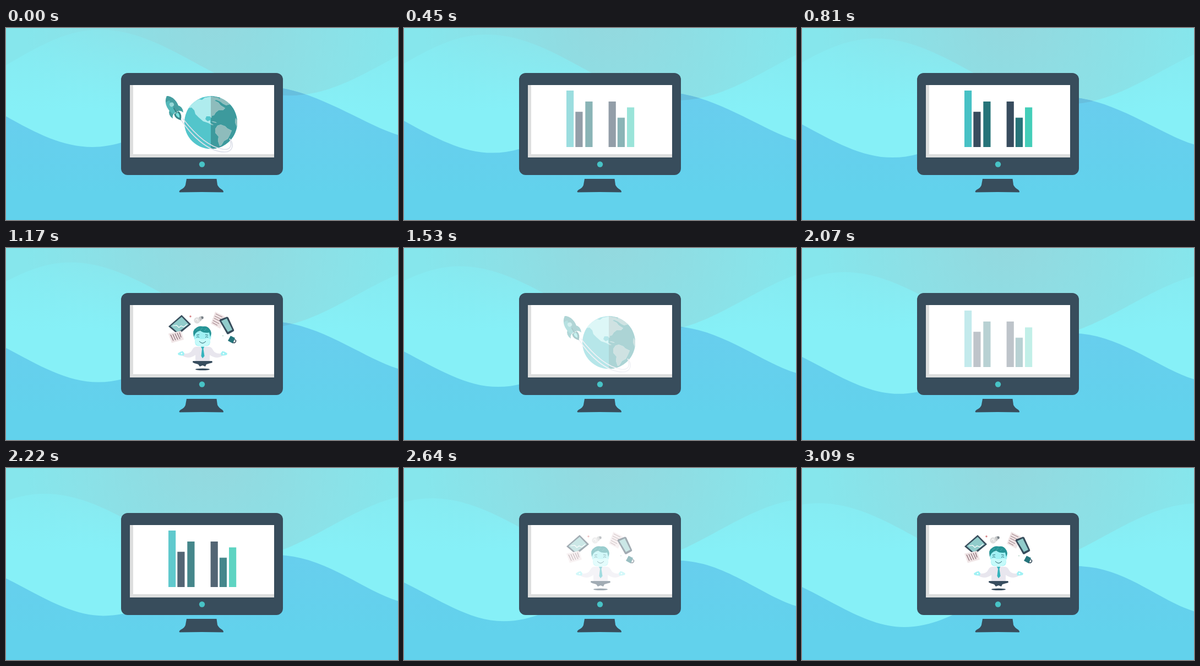
Recreate the animation shown at these times as an HTML page. Size 712x350 px, loop 3150 ms.

```html
<!DOCTYPE html>
<html lang="en">
<head>
<meta charset="utf-8">
<title>Monitor over waves</title>
<style>
  html, body { margin: 0; width: 100%; height: 100%; overflow: hidden; }
  svg { display: block; width: 100vw; height: 100vh; }
</style>
</head>
<body>
<svg viewBox="0 0 712 350" preserveAspectRatio="none">
  <defs>
    <radialGradient id="sky" gradientUnits="userSpaceOnUse" cx="375" cy="-20" r="340">
      <stop offset="0" stop-color="#94d8de"/>
      <stop offset="1" stop-color="#86e6ec"/>
    </radialGradient>
    <linearGradient id="mist" gradientUnits="userSpaceOnUse" x1="0" y1="0" x2="0" y2="150">
      <stop offset="0" stop-color="#86f1f8" stop-opacity=".25"/>
      <stop offset="1" stop-color="#86f0f7"/>
    </linearGradient>
    <linearGradient id="sea" gradientUnits="userSpaceOnUse" x1="0" y1="120" x2="0" y2="300">
      <stop offset="0" stop-color="#69cdee"/>
      <stop offset="1" stop-color="#62d2ec"/>
    </linearGradient>
    <clipPath id="seaClip"><path id="seaClipPath"/></clipPath>
    <clipPath id="globe"><circle cx="372" cy="172.3" r="48"/></clipPath>
    <clipPath id="east"><rect x="372" y="120" width="50" height="104"/></clipPath>
    <path id="land" d="M331 146L336 139L344 133L351 130L356 131L361 127L372 125L384 127L397 134L403 140L400 141L394 138L389 134L382 131L378 132L386 136L390 141L398 146L394 150L386 150L381 154L378 159L374 160L373 164L370 161L364 161L362 166L366 170L371 168L371 173L377 177L374 177L367 173L358 170L350 163L344 157L342 150L337 145Z
      M384 178L390 176L398 179L402 183L410 187L407 194L403 202L396 206L391 214L388 215L385 206L386 198L380 191L380 184Z
      M388 128L396 129L407 139L404 140L396 135Z M417 164L421 170L419 180L416 172Z M373 170L380 171L383 173L377 172Z"/>
  </defs>

  <rect width="712" height="350" fill="url(#sky)"/>
  <path id="hump" fill="url(#mist)"/>
  <path id="water" fill="url(#sea)"/>
  <path id="overlap" fill="#67bfde" clip-path="url(#seaClip)"/>

  <g fill="#384d5c">
    <rect x="209" y="82" width="294" height="186" rx="12"/>
    <path d="M328 275H382.500L384 286Q386 291 393 295Q396 298 394.500 299.500Q356 298.500 315.500 299.500Q313 298 317 295Q325 291 326 286Z"/>
  </g>
  <rect x="225" y="104" width="262" height="132" fill="#dddede"/>
  <rect x="231" y="104" width="256" height="126" fill="#fff"/>
  <circle cx="356" cy="248.500" r="5.200" fill="#47c2c5"/>

  <g id="travel">
    <circle cx="372" cy="172.300" r="48" fill="#47c1c8"/>
    <path d="M372 124.300A48 48 0 0 1 372 220.300Z" fill="#2f9396"/>
    <g clip-path="url(#globe)">
      <use href="#land" fill="#a9ebed"/>
      <use href="#land" fill="#86b8b7" clip-path="url(#east)"/>
    </g>
    <g fill="none" stroke="#dcdfe9" stroke-width="1.700">
      <path d="M317 166C335 194 366 226 397 226C414 226 414 209 406 202"/>
      <path d="M321 165C342 192 368 217 394 221C407 223 411 215 407 205"/>
    </g>
    <g transform="translate(292 124) rotate(-30)">
      <path d="M-8 24Q-16 31 -11 41Q-9 35 -4 34ZM8 24Q16 31 11 41Q9 35 4 34Z" fill="#389b9d"/>
      <path d="M0 0C9 6 13 18 7 34H-7C-13 18 -9 6 0 0Z" fill="#46b3b4"/>
      <path d="M0 0C9 6 13 18 7 34H0Z" fill="#3a9799"/>
      <path d="M0 0Q5 4 7.500 9H-7.500Q-5 4 0 0Z" fill="#389799"/>
      <circle cy="18" r="4" fill="#8fd5d5"/>
      <path d="M0 25V35" stroke="#267174" stroke-width="1.500"/>
      <path d="M-5 35H5Q8 43 0 51Q-8 43 -5 35Z" fill="#267c7f"/>
      <path d="M-2 36H2Q4 41 0 46Q-4 41 -2 36Z" fill="#72e0dc"/>
    </g>
  </g>

  <g id="bars"></g>

  <g id="calm">
    <ellipse cx="357" cy="221.300" rx="13" ry="1.800" fill="#384d5e"/>
    <path d="M340 206H374Q377 209 371 210L364 212L362 216L357 214L352 216L349 212L342 210Q337 208 340 206Z" fill="#384d5e"/>
    <path d="M347 180Q341 179 338 186Q334 194 322 192L320 196Q332 204 344 195V206H370V195Q383 204 394 196L392 192Q380 194 376 186Q373 179 367 180Z" fill="#e8e6ee"/>
    <g fill="#a0f1f4">
      <path d="M324 192L321 188L317 189L312 192L313 195L318 196L323 196ZM390 192L393 188L397 189L402 192L401 195L396 196L391 196Z"/>
      <path d="M342 154Q340 162 343 168Q342 178 350 179H364Q372 178 371 168Q374 161 372 153L364 149Z"/>
    </g>
    <path d="M343 166Q348 163 354 166H361Q367 163 371 166Q372 179 357 180Q342 179 343 166Z" fill="#c5fafa"/>
    <path d="M341 162Q338 149 345 146Q350 141 358 143Q366 142 370 148Q375 154 371 162L369 154Q360 156 353 151Q347 152 344 156Z" fill="#269496"/>
    <path d="M346 150L350 146M353 150L357 145M360 151L364 147" stroke="#4db4b4" stroke-width=".8"/>
    <g fill="none" stroke="#2a6470" stroke-width="1">
      <path d="M346 163Q348.500 160 351 163M362 163Q364.500 160 367 163M351 170Q357 177 363 170M346 159L351 158M362 158L367 159"/>
    </g>
    <path d="M354 180H360L358.500 184L360.500 197L357 201L354.500 197L356 184Z" fill="#36b4bd"/>
    <circle cx="319" cy="192.500" r="1.300" fill="#fff"/>
    <circle cx="395" cy="192.500" r="1.300" fill="#fff"/>

    <path d="M319 122L336 139L313 158L295 143Z" fill="#384d5c"/>
    <path d="M319 125.500L332 139L312 154L299 142.500Z" fill="#91cccb"/>
    <path d="M303 142L310 141L314 145L318 142L323 144L329 139" fill="none" stroke="#fff" stroke-width="1.200"/>
    <path d="M295 156L318 151L323 167L301 173Z" fill="#f0e5e6"/>
    <path d="M299 158L304 169M303 157L308 168M307 156L312 167M311 155L316 166M315 154L318 163" stroke="#8c7078" stroke-width="1.300"/>
    <path d="M380 116L398 125L389 147L372 138Z" fill="#f0e5e6"/>
    <path d="M381 120L393 126M379 124L391 130M378 128L390 134M376 132L387 138M375 136L384 141" stroke="#a58a90" stroke-width="1.200"/>
    <path d="M389 130L401 125.500Q403 125 404 127L414 149Q415 151 413 152L404 157Q402 158 401 156L388 133Q387 131 389 130Z" fill="#384d5c"/>
    <path d="M391 133L401 128.500L411 149L403 153Z" fill="#91cccb"/>
    <circle cx="347" cy="132" r="5.700" fill="#dedede"/>
    <path d="M350 126L355 124L358 128L353 134Z" fill="#c4c6c7"/>
    <path d="M354 125L358 124.500L359 128L356 130Z" fill="#777f85"/>
    <path d="M344 132L347 129L349 134" fill="none" stroke="#fff" stroke-width="1"/>
    <circle cx="335" cy="124.700" r="1.700" fill="#d98588"/>
    <circle cx="394" cy="160" r="1.200" fill="#c5dfd4"/>
    <path d="M408 160L416 164L412 174L403 169Z" fill="#24747b"/>
    <path d="M415 167Q419 168 417 171Q415 174 412 172" fill="none" stroke="#384d5c" stroke-width="1.600"/>
  </g>
</svg>
<script>
const LOOP = 3150, STEP = 30, CYCLE = 1680, FADE = 280;
const $ = id => document.getElementById(id);
const slides = [
  { node: $('bars'), start: 300 },
  { node: $('calm'), start: 830 },
  { node: $('travel'), start: 1420 }
];

const barColors = ['#47c1c5', '#384c5e', '#277479', '#384c5e', '#277479', '#44ceb9'];
const barSpots = [[295, 114], [311.3, 152.7], [329.3, 134], [371.6, 134], [387.8, 163.5], [405, 144.7]];
$('bars').innerHTML = barSpots.map(([x, y], i) =>
  `<rect x="${x}" y="${y}" width="13.200" height="${217 - y}" fill="${barColors[i]}"/>`).join('');

// A cosine crest that drifts left while it sinks.
function humpLine(t) {
  const peak = 170 - 0.0453 * t, top = 3 + 0.0198 * t;
  const points = [];
  for (let x = 0; x <= 712; x += 4) {
    const phase = (x - peak) / 346 * Math.PI * (x < peak ? 1.07 : 1);
    points.push(`${x} ${(top + 60 * (1 - Math.cos(phase))).toFixed(2)}`);
  }
  return 'M' + points.join('L');
}

function waterPath(t) {
  const left = 161 + 0.0181 * t, right = 195 + 0.0214 * t;
  const tx = 157 + 0.0091 * t, ty = 217 + 0.0236 * t;
  const cx = 470 + 0.0097 * t, cy = 107 + 0.0233 * t;
  return `M0 ${left}C${tx * 0.35} ${left + 31} ${tx * 0.66} ${ty} ${tx} ${ty}` +
    `C${tx + 110} ${ty} ${cx - 125} ${cy} ${cx} ${cy}` +
    `C${cx + 85} ${cy} 647 ${right - 20} 712 ${right}V350H0Z`;
}

function render(time) {
  const t = Math.floor(time % LOOP / STEP) * STEP;
  const line = humpLine(t), water = waterPath(t);
  $('hump').setAttribute('d', line + 'V350H0Z');
  $('overlap').setAttribute('d', line + 'V0H0Z');
  $('water').setAttribute('d', water);
  $('seaClipPath').setAttribute('d', water);

  // Each slide fades in, holds, then cuts to the next.
  const clock = t < slides[0].start ? t + CYCLE : (t - slides[0].start) % CYCLE + slides[0].start;
  const current = slides.filter(s => s.start <= clock).pop();
  for (const slide of slides) {
    const opacity = slide === current ? Math.min(1, (clock - slide.start) / FADE) : 0;
    slide.node.setAttribute('opacity', opacity);
  }
}

const origin = performance.now();
function tick() {
  render(performance.now() - origin);
  requestAnimationFrame(tick);
}
tick();
</script>
</body>
</html>
```
